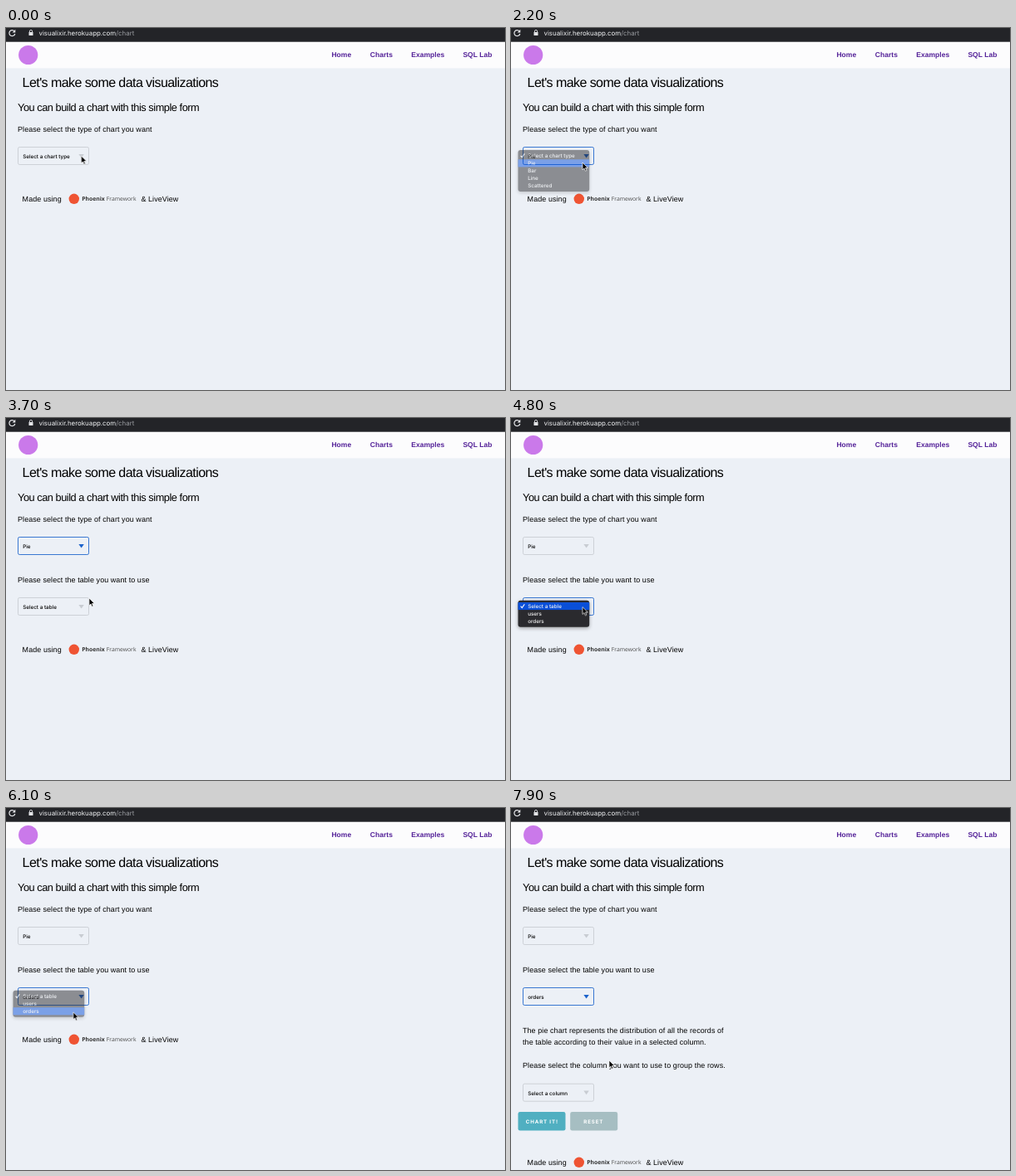
Recreate the animation shown at these times as an HTML page. Size 600 by 436 pixels, loop 8 s.

```html
<!DOCTYPE html>
<html lang="en">
<head>
<meta charset="utf-8">
<title>Chart form</title>
<style>
html, body { margin: 0; width: 100%; height: 100%; overflow: hidden; background: #ecf0f6; }
svg { display: block; width: 600px; height: 436px; text-rendering: geometricPrecision; }
text { white-space: pre; }
.copy { font: 8.95px "Liberation Sans", Arial, sans-serif; letter-spacing: .09px; }
.title { font: 16px "Liberation Sans", Arial, sans-serif; letter-spacing: -.57px; }
.sub { font: 12.75px "Liberation Sans", Arial, sans-serif; letter-spacing: -.45px; }
.nav { font: bold 8.5px "Liberation Sans", Arial, sans-serif; letter-spacing: .06px; fill: #552399; }
.url { font: 7.9px Inter, sans-serif; fill: #f1f2f4; }
.ui { font: 500 6.3px Inter, sans-serif; }
.brand { font: 6.8px "Open Sans", sans-serif; fill: #4d4d4d; }
.btn { font: bold 6.2px Inter, sans-serif; letter-spacing: .85px; fill: #fff; }
.menu { fill: #f5f5f5; }
.sel { color: #c8ccd2; }

/* 1% of the loop is 80 ms */
.hard, .menu, .cursor { animation: 8s infinite step-end; }
.focus1 { animation-name: focus1; }
.focus2 { animation-name: focus2; }
.ask1 { animation-name: ask1; }
.got1 { animation-name: got1; opacity: 0; }
.part2 { animation-name: part2; opacity: 0; }
.ask2 { animation-name: ask2; }
.got2 { animation-name: got2; opacity: 0; }
.part3 { animation-name: part3; opacity: 0; }
.foot { animation-name: foot; }
.row1 { animation-name: row1; }
.row2 { animation-name: row2; }
.menu1 { animation-name: menu1; animation-timing-function: linear; }
.menu2 { animation-name: menu2; animation-timing-function: linear; }
.cursor { animation-name: cursor; animation-timing-function: linear; }

@keyframes focus1 { 0% { color: #c8ccd2 } 6.25% { color: #1b62cb } 48.75%, 100% { color: #c8ccd2 } }
@keyframes focus2 { 0% { color: #c8ccd2 } 48.75%, 100% { color: #1b62cb } }
@keyframes ask1 { 0% { opacity: 1 } 26.25%, 100% { opacity: 0 } }
@keyframes got1 { 0% { opacity: 0 } 26.25%, 100% { opacity: 1 } }
@keyframes part2 { 0% { opacity: 0 } 32.5%, 100% { opacity: 1 } }
@keyframes ask2 { 0% { opacity: 1 } 75%, 100% { opacity: 0 } }
@keyframes got2 { 0% { opacity: 0 } 75%, 100% { opacity: 1 } }
@keyframes part3 { 0% { opacity: 0 } 78.75%, 100% { opacity: 1 } }
@keyframes foot {
  0% { transform: none }
  32.5% { transform: translateY(73px) }
  78.75%, 100% { transform: translateY(221px) }
}
@keyframes row1 { 0% { transform: none } 21.25%, 100% { transform: translateY(9.1px) } }
@keyframes row2 {
  0% { transform: none }
  62.5% { transform: translateY(9.1px) }
  66.25%, 100% { transform: translateY(18.2px) }
}
@keyframes menu1 { 0%, 7.49% { opacity: 0 } 7.5%, 26.25% { opacity: 1 } 28.75%, 100% { opacity: 0 } }
@keyframes menu2 { 0%, 49.99% { opacity: 0 } 50%, 75% { opacity: 1 } 77.5%, 100% { opacity: 0 } }
@keyframes cursor {
  0%, 1.25% { transform: translate(90.5px, 154px) }
  3.75%, 6.25% { transform: translate(89px, 154.5px) }
  10%, 20% { transform: translate(87.5px, 155px) }
  22.5%, 28% { transform: translate(86px, 162px) }
  30% { transform: translate(100px, 159px) }
  31.25%, 37.5% { transform: translate(177.8px, 139px) }
  47.5% { transform: translate(89px, 228px) }
  53.75%, 60% { transform: translate(86px, 227.5px) }
  68.75%, 73.75% { transform: translate(79px, 246px) }
  80%, 85% { transform: translate(83.5px, 245.5px) }
  90%, 91.25% { transform: translate(90px, 281px) }
  95%, 97.5% { transform: translate(117.5px, 297.5px) }
  98.75%, 100% { transform: translate(118px, 304px) }
}
</style>
</head>
<body>
<svg viewBox="0 0 600 436">
  <defs>
    <g id="select">
      <rect x="14.5" y=".5" width="85" height="21" rx="1.8" fill="none" stroke="currentColor" stroke-opacity=".85"/>
      <path d="M87.4 8.9h6.4l-3.2 4.6z" fill="currentColor"/>
    </g>
    <path id="check" d="M11.6 4.6l1.7 1.9 3-4.3" fill="none" stroke="#fff" stroke-width="1.1"/>
    <filter id="shade" x="-20%" y="-20%" width="140%" height="150%">
      <feDropShadow dx="0" dy="1.5" stdDeviation="2" flood-opacity=".35"/>
    </filter>
  </defs>

  <rect width="600" height="436" fill="#ecf0f6"/>
  <rect y="16" width="600" height="32.5" fill="#fcfcfd"/>
  <rect width="600" height="16.7" fill="#232428"/>

  <g fill="none" stroke="#e4e5e8" stroke-width="1.2">
    <path d="M10.2 4A3.5 3.5 0 1 0 10.8 7"/>
    <path d="M28.4 5.5V4a1.6 1.6 0 0 1 3.2 0v1.5" stroke-width=".9"/>
  </g>
  <path d="M11.3 1.8v3.6H7.7z M27.5 5h5v4h-5z" fill="#e4e5e8"/>
  <text class="url" x="39.5" y="8.8">visualixir.herokuapp.com<tspan fill="#9a9ca1">/chart</tspan></text>

  <circle cx="26.7" cy="32.5" r="11.6" fill="#ca79ea"/>
  <g class="nav">
    <text x="391.4" y="35.2">Home</text>
    <text x="437.7" y="35.2">Charts</text>
    <text x="487.2" y="35.2">Examples</text>
    <text x="549.4" y="35.2">SQL Lab</text>
  </g>

  <text class="title" x="19.6" y="71.3">Let's make some data visualizations</text>
  <text class="sub" x="14" y="99.8">You can build a chart with this simple form</text>
  <text class="copy" x="14" y="124.6">Please select the type of chart you want</text>
  <use href="#select" y="143" class="sel hard focus1"/>
  <g class="ui">
    <text class="hard ask1" x="20.2" y="157.2">Select a chart type</text>
    <text class="hard got1" x="20.2" y="157.2">Pie</text>
  </g>

  <g class="hard part2">
    <text class="copy" x="14" y="197.6">Please select the table you want to use</text>
    <use href="#select" y="216" class="sel hard focus2"/>
    <g class="ui">
      <text class="hard ask2" x="20.2" y="230.1">Select a table</text>
      <text class="hard got2" x="20.2" y="230.1">orders</text>
    </g>
  </g>

  <g class="hard part3">
    <g class="copy">
      <text x="14" y="270.5">The pie chart represents the distribution of all the records of</text>
      <text x="14" y="284.8">the table according to their value in a selected column.</text>
      <text x="14" y="313.3">Please select the column you want to use to group the rows.</text>
    </g>
    <use href="#select" y="331.7" class="sel"/>
    <text class="ui" x="20.2" y="345.6">Select a column</text>
    <rect x="8.5" y="366" width="57" height="22.6" rx="2.4" fill="#50afc1"/>
    <rect x="71.2" y="366" width="57" height="22.6" rx="2.4" fill="#a6bec2"/>
    <text class="btn" x="17.8" y="379.6">CHART IT!</text>
    <text class="btn" x="87.3" y="379.6">RESET</text>
  </g>

  <g class="hard foot">
    <text class="copy" x="19.6" y="209">Made using</text>
    <circle cx="81.8" cy="205.8" r="6.2" fill="#ef5433"/>
    <text class="brand" x="91.3" y="208.2" font-weight="bold"><tspan font-weight="bold" fill="#333">Phoenix</tspan></text>
    <text class="brand" x="120.8" y="208.2">Framework</text>
    <text class="copy" x="162.4" y="209">&amp; LiveView</text>
  </g>

  <g class="menu menu1 ui" opacity="0">
    <rect x="8.5" y="147" width="85.7" height="50" rx="3" fill="#2b2b2d" filter="url(#shade)"/>
    <rect class="hard row1" x="8.5" y="149.2" width="85.7" height="9.1" fill="#0a4fd8"/>
    <use href="#check" y="149.2"/>
    <text x="20.2" y="156">Select a chart type</text>
    <text x="20.2" y="165.1">Pie</text>
    <text x="20.2" y="174.2">Bar</text>
    <text x="20.2" y="183.3">Line</text>
    <text x="20.2" y="192.4">Scattered</text>
  </g>

  <g class="menu menu2 ui" opacity="0">
    <rect x="8.5" y="219.8" width="85.7" height="31.9" rx="3" fill="#2b2b2d" filter="url(#shade)"/>
    <rect class="hard row2" x="8.5" y="222" width="85.7" height="9.1" fill="#0a4fd8"/>
    <use href="#check" y="222"/>
    <text x="20.2" y="228.9">Select a table</text>
    <text x="20.2" y="238">users</text>
    <text x="20.2" y="247.1">orders</text>
  </g>

  <path class="cursor" d="M0 0V8.8L2 7 3.4 10.2 4.9 9.6 3.5 6.5H6.3z" fill="#000" stroke="#fff" stroke-width=".7"/>
</svg>
</body>
</html>
```
